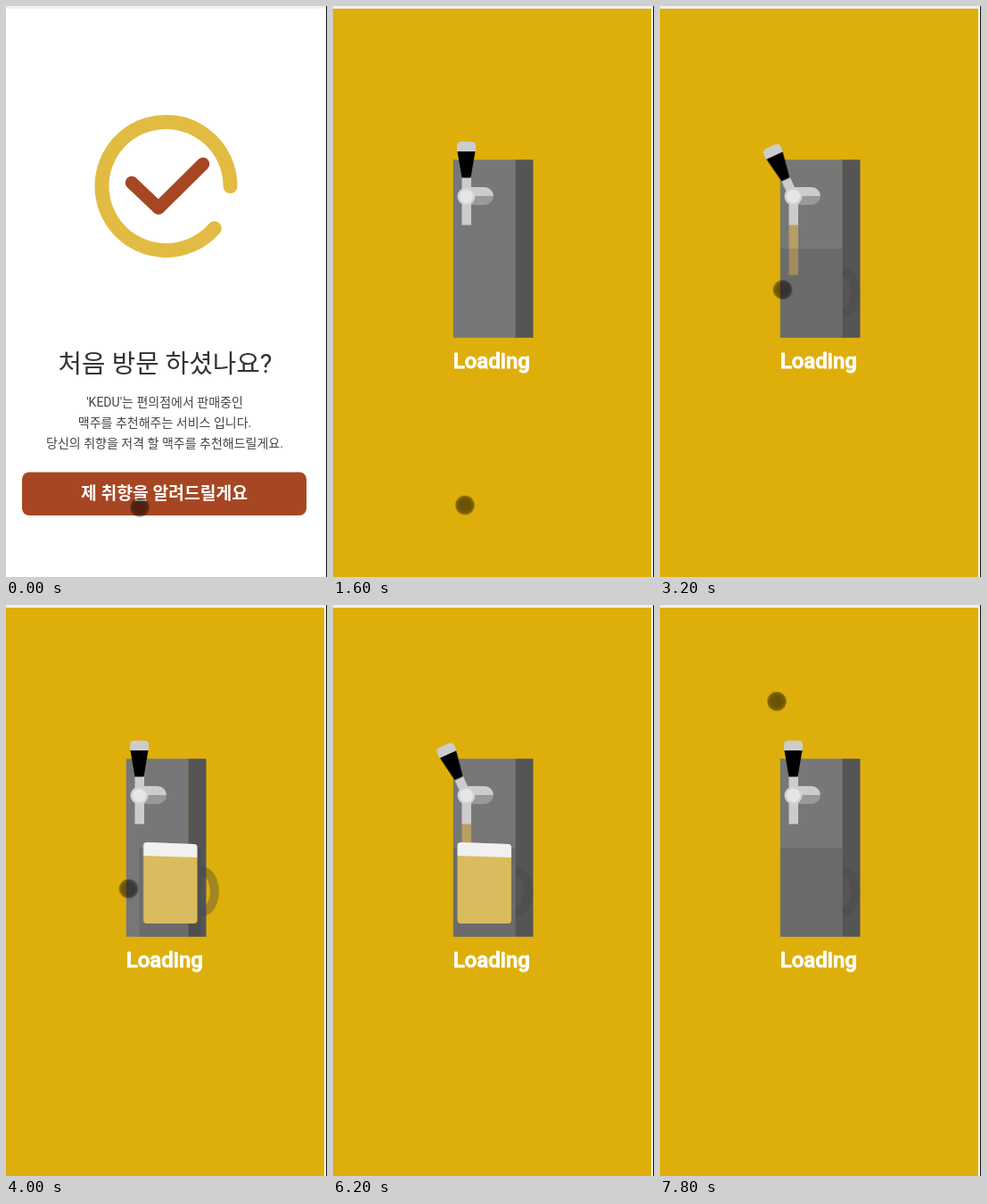
An HTML page for the animation above (8 s loop, 360 by 640 pixels).

```html
<!DOCTYPE html>
<html lang="ko">
<head>
<meta charset="utf-8">
<title>Loading</title>
<style>
html, body { margin: 0; width: 100%; height: 100%; overflow: hidden; background: #fff; }
svg { display: block; width: 100vw; height: 100vh; }
text { font-family: Roboto, "Noto Sans CJK KR", "Noto Sans CJK", sans-serif; text-anchor: middle; }
.body { font-size: 14px; fill: #444; }

.page, .lever, .stream, .beer, .mug, .cursor { animation: 8s linear infinite; }
.page { animation-name: page; animation-timing-function: step-end; }
.lever { animation-name: lever; transform-origin: 149.5px 213px; }
.stream { animation-name: stream; transform-origin: 149px 245px; }
.beer { animation-name: beer; transform-origin: 169px 357px; }
.mug { animation-name: mug; }
.cursor { animation-name: cursor; }

@keyframes page {
  0% { visibility: visible; }
  19.9%, 100% { visibility: hidden; }
}
@keyframes lever {
  0%, 39% { transform: rotate(0deg); }
  40% { transform: rotate(-24.5deg); }
  42.5%, 46.5% { transform: rotate(-90deg); }
  48.75%, 60% { transform: rotate(0deg); }
  62.5% { transform: rotate(-88deg); }
  63%, 75.6% { transform: rotate(-90deg); }
  77.5% { transform: rotate(-24.5deg); }
  78.5%, 100% { transform: rotate(0deg); }
}
@keyframes stream {
  0%, 39.2% { transform: scaleY(0); }
  40% { transform: scaleY(.5); }
  41%, 47% { transform: scaleY(1); }
  48.2%, 61.8% { transform: scaleY(0); }
  63.2%, 76.8% { transform: scaleY(1); }
  78.2%, 100% { transform: scaleY(0); }
}
@keyframes beer {
  0%, 41% { transform: scaleY(0); }
  46.75%, 56% { transform: scaleY(1); }
  56.1%, 65% { transform: scaleY(0); }
  67.5% { transform: scaleY(.29); }
  73.75%, 91% { transform: scaleY(1); }
  91.1%, 100% { transform: scaleY(0); }
}
@keyframes mug {
  0%, 27.5% { transform: translateX(225px); animation-timing-function: ease-out; }
  33.5%, 48.4% { transform: none; }
  50% { transform: translateX(14px); }
  55%, 58% { transform: translateX(225px); }
  62.5% { transform: translateX(48px); }
  65%, 85.2% { transform: none; }
  86.8% { transform: translateX(14px); }
  90%, 92.5% { transform: translateX(225px); opacity: 1; }
  92.6% { transform: none; opacity: 0; }
  95% { transform: none; opacity: .8; }
  97%, 100% { transform: none; opacity: 1; }
}
@keyframes cursor {
  0% { transform: translate(150px, 562px); }
  2.5% { transform: translate(140px, 558px); }
  7.5%, 21% { transform: translate(148px, 559.5px); animation-timing-function: ease-in-out; }
  32%, 51% { transform: translate(137.5px, 318px); opacity: 1; }
  52.5% { transform: translate(137.5px, 318px); opacity: 0; }
  94.8% { transform: translate(104px, 110px); opacity: 0; }
  95% { transform: translate(104px, 110px); opacity: 1; }
  97.5%, 100% { transform: translate(131px, 108px); opacity: 1; }
}
</style>
</head>
<body>
<svg viewBox="0 0 360 640" preserveAspectRatio="none">
  <defs>
    <clipPath id="glass"><rect x="139.5" y="260" width="60.5" height="97" rx="4"/></clipPath>
    <clipPath id="stage"><rect width="357" height="640"/></clipPath>
    <radialGradient id="touch">
      <stop offset=".55" stop-opacity=".52"/>
      <stop offset=".85" stop-opacity=".42"/>
      <stop offset="1" stop-opacity="0"/>
    </radialGradient>
  </defs>
  <rect width="360" height="640" fill="#fff"/>

  <g clip-path="url(#stage)">
    <rect width="357" height="640" fill="#deaf0a"/>
    <rect x="134.8" y="172.3" width="70" height="199.5" fill="#777"/>
    <rect x="204.5" y="172.3" width="20" height="199.5" fill="#555"/>

    <rect class="stream" x="144.5" y="245" width="10.5" height="112" fill="#dcb456" opacity=".64"/>
    <g class="mug">
      <path d="M135 272h69.5v100h-69.5z" fill="#333" opacity=".16"/>
      <path d="M205 298C224 300 224 342 205 344" fill="none" stroke="#474747" stroke-width="10" opacity=".4"/>
      <g clip-path="url(#glass)">
        <g class="beer">
          <path d="M139 357V271Q139 266 144 266L196 268Q200 268 200 272V357Z" fill="#dabb5d"/>
          <path d="M139 281V271Q139 266 144 266L196 268Q200 268 200 272V283Z" fill="#f1f1f1"/>
        </g>
      </g>
    </g>

    <path d="M149 203H170A10 10 0 0 1 180 213H149Z" fill="#ccc"/>
    <path d="M149 213H180A10 10 0 0 1 170 223H149Z" fill="#999"/>
    <rect x="144.5" y="213" width="10.5" height="32.5" fill="#ccc"/>
    <g class="lever">
      <rect x="144.5" y="191" width="10.5" height="22" fill="#ccc"/>
      <path d="M139.5 163H159.5L154.5 192.5H144.5Z" fill="#000"/>
      <path d="M139 163V157Q139 152 144 152H155Q160 152 160 157V163Z" fill="#ccc"/>
    </g>
    <circle cx="149.5" cy="213.5" r="10" fill="#d2d2d2"/>
    <circle cx="149.5" cy="213.5" r="7.5" fill="#e6e6e6"/>
    <text x="177.8" y="406" font-size="24" font-weight="500" fill="#fff" stroke="#fff" stroke-width=".9">Loading</text>
  </g>

  <g class="page">
    <rect width="358" height="640" fill="#fff"/>
    <g fill="none" stroke-linecap="round" stroke-linejoin="round">
      <path d="M251.5 202A72 72 0 1 0 233.8 249.2" stroke="#e2bb43" stroke-width="16"/>
      <path d="M141 198L171 226.5L221 177" stroke="#a74622" stroke-width="14.5"/>
    </g>
    <text x="178.5" y="411" font-size="28.8" fill="#333">처음 방문 하셨나요?</text>
    <text class="body" x="178" y="448.5">'KEDU'는 편의점에서 판매중인</text>
    <text class="body" x="178" y="472">맥주를 추천해주는 서비스 입니다.</text>
    <text class="body" x="178" y="495">당신의 취향을 저격 할 맥주를 추천해드릴게요.</text>
    <rect x="18" y="522.5" width="319" height="48.5" rx="8" fill="#a74622"/>
    <text x="177.5" y="552.5" font-size="19.3" font-weight="700" fill="#fff">제 취향을 알려드릴게요</text>
  </g>

  <rect width="360" height="3" fill="#f0f0f0"/>
  <rect x="359" width="1" height="640" fill="#111"/>
  <circle class="cursor" r="11.5" fill="url(#touch)"/>
</svg>
</body>
</html>
```
